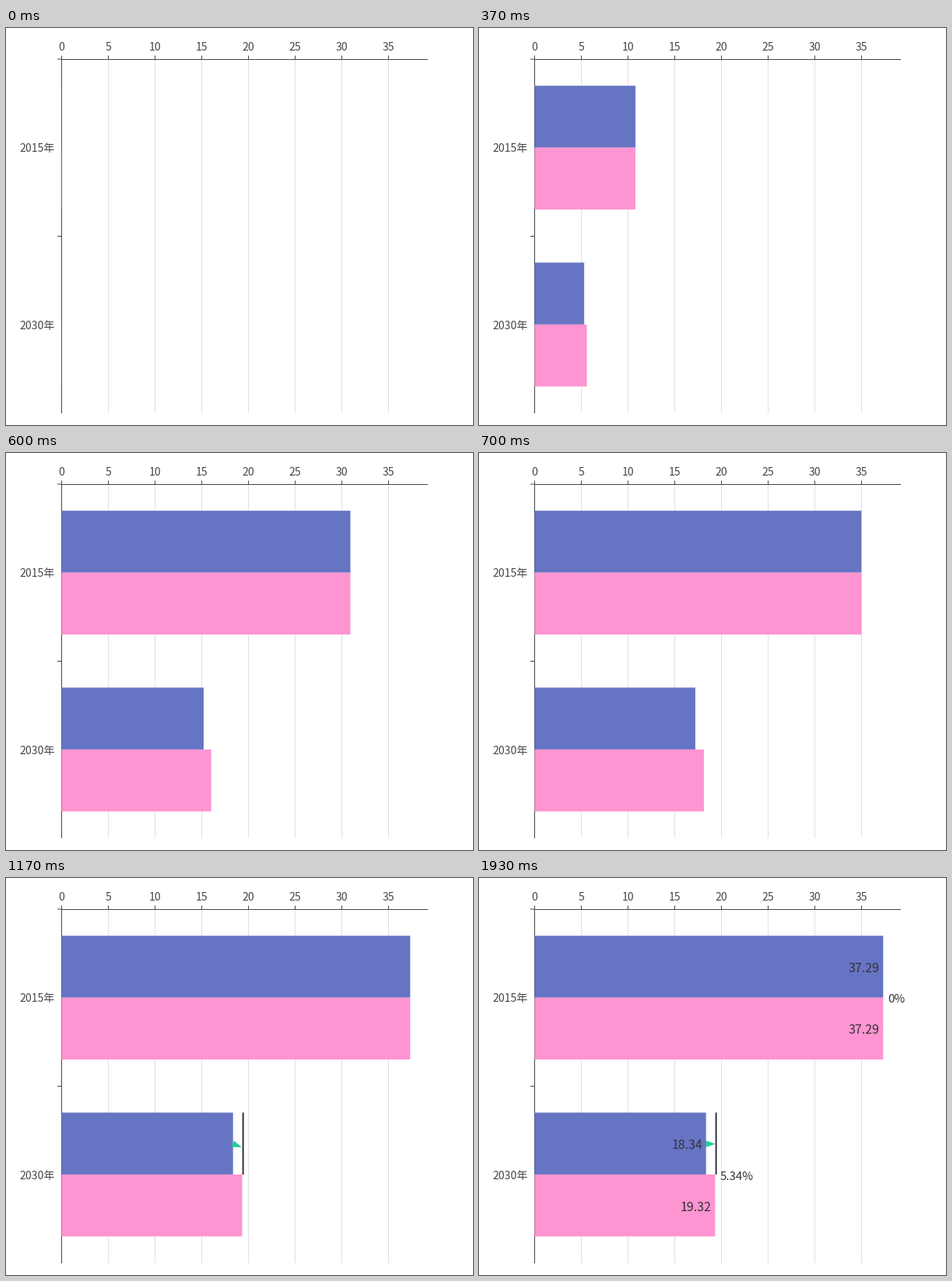
Write a matplotlib script that moves like this. It is 600 by 510 pixels and loops after 3.01 s.

```python
import math

import matplotlib.pyplot as plt
from matplotlib.animation import FuncAnimation
from matplotlib.patches import Polygon, Rectangle

W, H, DPI = 600, 510, 60
LOOP, STEP = 3010, 10

X0, UNIT = 71.4, 12.0116        # zero line and pixels per unit
TOP, BAND = 40.1, 227.2         # first category top and category height
BAR = 0.35 * BAND
INK, GRID, TEXT = "#464646", "#e0e0e0", "#333333"
BLUE, PINK, GREEN = "#6674c4", "#ff94d2", "#25cb95"

YEARS = ["2015年", "2030年"]
DATA = [(37.29, 37.29), (18.34, 19.32)]
CHANGES = ["0%", "5.34%"]

plt.rcParams["font.family"] = "Noto Sans CJK JP"
fig = plt.figure(figsize=(W / DPI, H / DPI), dpi=DPI, facecolor="white")
ax = fig.add_axes([0, 0, 1, 1])
ax.set_xlim(0, W)
ax.set_ylim(H, 0)
ax.axis("off")


def box(x, y, w, h, color, z=1):
    patch = Rectangle((x, y), w, h, fc=color, lw=0, zorder=z, snap=False)
    return ax.add_patch(patch)


def label(x, y, s, px, ha, color=INK):
    return ax.text(x, y, s, fontsize=px * 72 / DPI, ha=ha, va="baseline",
                   color=color, zorder=6)


def clamp(v):
    return min(max(v, 0.0), 1.0)


def cubic_in_out(p):
    return 4 * p ** 3 if p < 0.5 else 1 - 4 * (1 - p) ** 3


# Axes, grid and tick labels
for value in range(0, 40, 5):
    x = int(X0 + value * UNIT)
    if value:
        box(x, 41, 1, 453.5, GRID)
    box(x, 35.5, 1, 5, INK)
    label(x + 0.4, 29, str(value), 14, "center")
box(71, 40, 471, 1, INK)
box(71, 39.5, 1, 455.5, INK)
for i, year in enumerate(YEARS):
    box(66, (39.5, 267)[i], 5, 1, INK)
    label(62.8, 159 + 228 * i, year, 14, "right")

# Bars with their values, and the change between each pair
bars, labels = [], []
for i, pair in enumerate(DATA):
    mid = TOP + BAND * (i + 0.5)
    for j, (value, color) in enumerate(zip(pair, (BLUE, PINK))):
        y = mid - BAR + j * BAR
        bars.append((box(X0, y, 0, BAR, color, 3), value))
        labels.append(label(X0 + value * UNIT - 4.5, round(y + 46.7), f"{value:.2f}",
                            16, "right", TEXT))
    labels.append(label(X0 + max(pair) * UNIT + 6.4, round(mid + 6.6), CHANGES[i],
                        15, "left", TEXT))

mark_y = TOP + 1.5 * BAND - BAR
marker = box(303.6, mark_y, 2, 0, TEXT, 5)
arrow = ax.add_patch(Polygon([(0, 0)] * 3, fc=GREEN, lw=0, zorder=4))


def arrow_points(angle):
    """Triangle turning about the middle of its base."""
    c, s = math.cos(angle), math.sin(angle)
    return [(291.4 + u * c - v * s, 341.6 + u * s + v * c)
            for u, v in ((0, -4.3), (12.2, 0), (0, 4.3))]


def draw(n):
    tick = (n * STEP + 5) * 3 // 100     # motion advances 30 times a second
    t = tick * 100 / 3

    grow = cubic_in_out(clamp((t + 50) / 1000))
    for bar, value in bars:
        bar.set_width(value * UNIT * grow)

    marker.set_height(BAR * clamp((t - 967) / 100))

    q = clamp((t - 985) / 600)
    arrow.set_visible(q > 0)
    arrow.set_xy(arrow_points(math.radians(60) * (1 - q) ** 3))

    fade = clamp((tick - 54) / 4)
    for text in labels:
        text.set_visible(fade > 0)
        text.set_alpha(fade)
    return []


anim = FuncAnimation(fig, draw, frames=LOOP // STEP, interval=STEP,
                     repeat=True, repeat_delay=0, blit=False)
plt.show()
```
